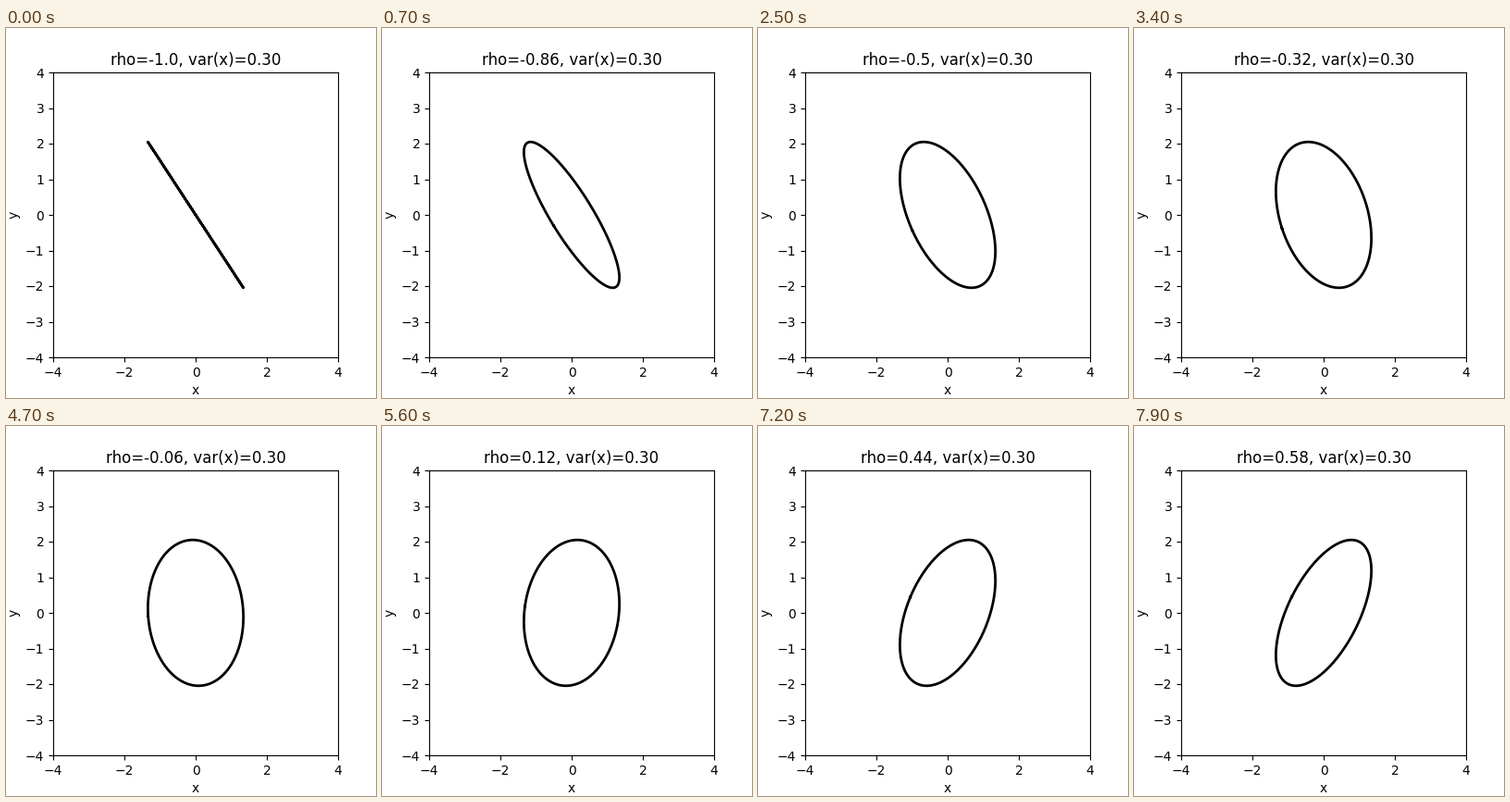
These frames come from a looping animation (400 px wide and 400 px high, 8000 ms). A matplotlib script:

```python
import numpy as np
import matplotlib.pyplot as plt
from matplotlib.animation import FuncAnimation

FRAMES = 80
INTERVAL = 100
VAR_X, VAR_Y = 0.3, 0.7
RADIUS = np.sqrt(-2 * np.log(0.05))  # 95 % contour of a 2-D normal

plt.rcParams["font.family"] = "DejaVu Sans"

theta = np.linspace(0, 2 * np.pi, 1000)
circle = RADIUS * np.array([np.cos(theta), np.sin(theta)])


def ellipse(rho):
    """Confidence ellipse traced from the end of its minor axis."""
    cov = rho * np.sqrt(VAR_X * VAR_Y)
    values, vectors = np.linalg.eigh([[VAR_X, cov], [cov, VAR_Y]])
    scale = np.sqrt(np.clip(values, 0, None))
    return vectors @ (scale[:, None] * circle)


fig, ax = plt.subplots(figsize=(4, 4), dpi=100)
ax.set_aspect("equal")
ax.set(xlim=(-4, 4), ylim=(-4, 4), xlabel="x", ylabel="y")
ax.set_xticks(range(-4, 5, 2))
ax.set_yticks(range(-4, 5))
line, = ax.plot([], [], color="black", lw=2)
title = ax.set_title("")


def update(i):
    rho = (i - 50) / 50
    line.set_data(*ellipse(rho))
    title.set_text(f"rho={round(rho, 2)}, var(x)={VAR_X:.2f}")
    return line, title


anim = FuncAnimation(fig, update, frames=FRAMES, interval=INTERVAL,
                     repeat=True, repeat_delay=0, blit=False)
plt.show()
```
